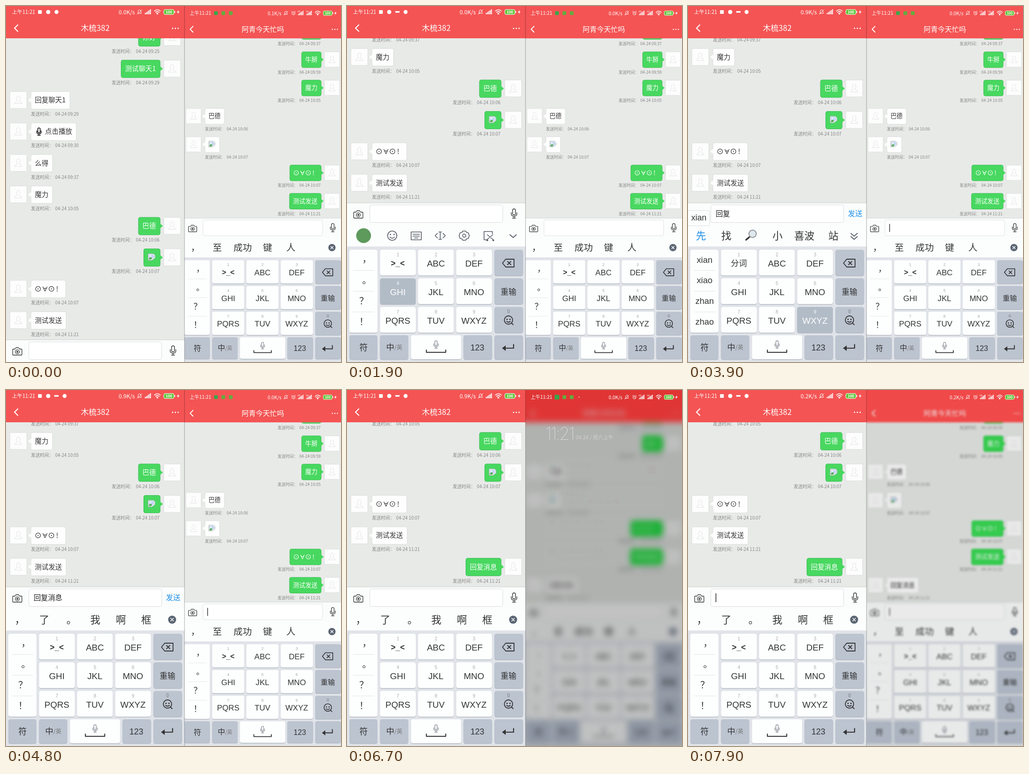
Animation, 726 px wide and 772 px high, one loop 8000 ms. Source, as an HTML page:

```html
<!DOCTYPE html>
<html lang="zh-CN">
<head>
<meta charset="utf-8">
<title>Chat</title>
<style>
html, body { margin: 0; width: 100%; height: 100%; overflow: hidden; background: #e8eae8; }
svg { display: block; }
text { font-family: 'Noto Sans CJK SC', 'Noto Sans CJK', 'Noto Sans', sans-serif; white-space: pre; }
.latin { font-family: 'Liberation Sans', Roboto, sans-serif; }
.symbol { font-family: 'DejaVu Sans', sans-serif; }
.clock { font-family: Inter, Roboto, sans-serif; font-weight: 100; letter-spacing: -3px; }
</style>
</head>
<body>
<svg id="stage" width="726" height="772" viewBox="0 0 726 772"></svg>
<script>
const LOOP = 8000, STEP = 100, PITCH = 68.2;
const RED = '#f45454', GREEN = '#48d860', INK = '#333';

const clamp = v => Math.max(0, Math.min(1, v));
const easeOut = (t, start, length) => 1 - (1 - clamp((t - start) / length)) ** 3;
const within = (t, spans) => spans.some(([a, b]) => t >= a && t < b);

const text = (x, y, s, size, fill = INK, extra = '') =>
  `<text x="${x}" y="${y}" font-size="${size}" fill="${fill}" ${extra}>${s}</text>`;
const mid = (x, y, s, size, fill, extra = '') => text(x, y, s, size, fill, `text-anchor="middle" ${extra}`);
const rect = (x, y, w, h, fill, rx = 0, extra = '') =>
  `<rect x="${x}" y="${y}" width="${w}" height="${h}" rx="${rx}" fill="${fill}" ${extra}/>`;
const circle = (x, y, r, fill, extra = '') => `<circle cx="${x}" cy="${y}" r="${r}" fill="${fill}" ${extra}/>`;
const line = (d, color = INK, width = 1.3) =>
  `<path d="${d}" fill="none" stroke="${color}" stroke-width="${width}" stroke-linecap="round" stroke-linejoin="round"/>`;
const shape = (d, fill) => `<path d="${d}" fill="${fill}"/>`;
const group = (transform, body, extra = '') => `<g transform="${transform}" ${extra}>${body}</g>`;
const at = (x, y, body, scale = 1) => group(`translate(${x} ${y}) scale(${scale})`, body);

// Small icons, drawn around their own centre
const mic = (color, width = 1.4) =>
  `<rect x="-3.2" y="-10" width="6.4" height="13" rx="3.2" fill="none" stroke="${color}" stroke-width="${width}"/>` +
  line('M-6 -2V1Q-6 6 0 6T6 1V-2M0 6V10M-3.5 10H3.5', color, width);
const camera = line('M-9 -5H-5L-3 -8H3L5 -5H9Q10 -5 10 -4V7Q10 8 9 8H-9Q-10 8 -10 7V-4Q-10 -5 -9 -5Z') +
  circle(0, 1, 4.3, 'none', `stroke="${INK}" stroke-width="1.3"`) + circle(0, 1, 2, INK);
const brokenImage = '<path d="M-7.5 -7H4L7.5 -3.5V2L1 7H-7.5Z" fill="#f2f5f7" stroke="#a9afb5" stroke-width="1"/>' +
  shape('M-6 -5.5H3L6 -2V1L0 5H-6Z', '#c4d6f2') + shape('M-6 5.5V3Q-3 -1 1 2L-0.5 5.5Z', '#5cae58') +
  circle(-2.5, -2.5, 1.6, '#fff');
const person = line('M-8 8Q-7 4 -2 3Q-4 0 -4 -4Q-3 -8 0 -8T4 -4Q4 0 2 3Q7 4 8 8Z', '#e2e4e4', 1);
const smiley = circle(0, 0, 10, 'none', 'stroke="#535c66" stroke-width="1.6"') +
  circle(-4, -2.5, 1.4, '#535c66') + circle(4, -2.5, 1.4, '#535c66') + line('M-5 3Q0 8 5 3', '#535c66', 1.6);
const smileSearch = circle(0, 0, 9, 'none', `stroke="${INK}" stroke-width="1.8"`) +
  circle(-3.2, -1.5, 1.5, INK) + circle(3.2, -1.5, 1.5, INK) + line('M-4 3Q0 6.5 4 3M6.5 6.5L10 10', INK, 1.8);
const lens = line('M-4 4L-11 10', '#333', 3.5) + circle(3, -3, 8, '#dfe8ec', 'stroke="#8d9499" stroke-width="2"');
const heart = shape('M0 6Q-7 1 -7 -2.5A3.6 3.6 0 0 1 0 -4A3.6 3.6 0 0 1 7 -2.5Q7 1 0 6Z', '#e2404c');
const bell = line('M-4 3H4L3 1V-2Q2 -5 0 -5T-3 -2V1ZM-5 5L5 -5', '#fff', 1);
const alarm = circle(0, 0.5, 3.8, 'none', 'stroke="#fff" stroke-width="1.1"') +
  line('M0 -1.5V1H2M-5 -3L-3 -5M5 -3L3 -5', '#fff', 1);
const signal = [0, 1, 2, 3, 4].map(i => rect(i * 2.8, 2 - i * 2, 1.9, 3 + i * 2, '#fff')).join('');
const wifi = line('M-6.5 -2Q0 -8 6.5 -2M-4 0.8Q0 -3 4 0.8', '#fff', 1.6) + circle(0, 3.4, 1.9, '#fff');
const battery = rect(0, -5.5, 22, 11, '#62c63c', 3, 'stroke="#fff" stroke-width="1"') + rect(22.8, -2, 1.6, 4, '#fff') +
  mid(11, 3.2, '100', 8.5, '#fff', 'class="latin" font-weight="bold"');
const bolt = shape('M1.5 -5L-3 1H0L-1.5 5L3 -1H0Z', '#fff');

function bubbleBody(body, color) {
  if (body === 'image') return [18, at(8.5, 18, brokenImage)];
  if (body === 'face') {
    const eye = x => circle(x, 19, 5.2, 'none', `stroke="${color}" stroke-width="1.2"`) + circle(x, 19, 1.1, color);
    return [58, eye(7) + line('M17.5 14.5L22 24L26.5 14.5M19 18H25', color, 1.2) + eye(36) + text(46, 24.5, '!', 15, color)];
  }
  const label = body.replace('♪', ''), voice = label !== body;
  const width = [...label].reduce((w, c) => w + (c < '~' ? 8.2 : 14.7), 0) + (voice ? 22 : 0);
  const icon = voice ? at(9, 19, mic('#222', 2.2), 0.8) : '';
  return [width, icon + text(voice ? 22 : 0, 24, label, 14.7, color)];
}

function message(y, [own, body, time]) {
  const [inner, content] = bubbleBody(body, own ? '#fff' : INK);
  const w = inner + 17.5, x = own ? 334 - w : 54, fill = own ? GREEN : '#fdfefd', edge = own ? '#3fc057' : '#dbdedc';
  const tail = own ? 'M333.5 13.5L340 19L333.5 24.5' : 'M54.5 13.5L48 19L54.5 24.5';
  const avatarX = own ? 342 : 8.5, stampX = own ? 229 : 54;
  return at(0, y,
    rect(avatarX, 0.5, 36.5, 36.5, '#fcfdfc', 1.5, 'stroke="#dcdfdd" stroke-width="1"') + at(avatarX + 18.2, 18, person) +
    rect(x, 0.3, w, 38, fill, 4, `stroke="${edge}" stroke-width="1.1"`) + shape(tail, fill) +
    at(x + 8.5, 0, content) +
    text(stampX, 53, '发送时间：', 9.7, '#858585') + text(stampX + 52.5, 53, '04-24 ' + time, 9.7, '#858585'));
}
const chat = (top, rows) => rows.map((row, i) => message(top + i * PITCH, row)).join('');

const LEFT_ROWS = [
  [1, '你好', '09:25'], [1, '测试聊天1', '09:29'], [0, '回复聊天1', '09:29'], [0, '♪点击播放', '09:30'],
  [0, '么得', '09:37'], [0, '魔力', '10:05'], [1, '巴德', '10:06'], [1, 'image', '10:07'],
  [0, 'face', '10:07'], [0, '测试发送', '11:21'], [1, '回复消息', '11:21']];
const RIGHT_ROWS = [
  [1, '么得', '09:37'], [1, '牛掰', '09:59'], [1, '魔力', '10:05'], [0, '巴德', '10:06'], [0, 'image', '10:07'],
  [1, 'face', '10:07'], [1, '测试发送', '11:21'], [0, '回复消息', '11:21']];

function inputBar({ value = '', cursor, pinyin = '' }) {
  const caretX = 60.5 + value.length * 15.5;
  return rect(-60, 427, 520, 48, '#fbfdfc') + rect(-60, 426.5, 520, 1, '#cdd0cf') + at(24.5, 452, camera) +
    rect(49.5, 431.5, 288, 38, '#fff', 4, 'stroke="#dadddc" stroke-width="1"') +
    (value ? text(60, 455.5, value, 15.5, '#222') + text(346.5, 455.5, '发送', 15.7, '#1d8fe8') : at(362, 450, mic(INK))) +
    (cursor ? rect(caretX - 1, 441, 2, 19, '#555') : '') +
    (pinyin ? rect(-1, 443.5, 48 + Math.max(0, pinyin.length - 4) * 9, 33, '#fcfdfd', 3, 'stroke="#dcdfe2"') +
      text(7, 465, pinyin, 18, INK, 'class="latin"') : '');
}

const toolbar = () =>
  circle(36, 498, 16, '#5d9a5c') + at(98, 498, smiley) +
  line('M139 490H161V507H139ZM143 495H157M143 499H157M146 503H154', '#535c66', 1.6) +
  line('M196 493L191 498L196 503M208 493L213 498L208 503M202 490V506M199 490H205M199 506H205', '#535c66', 1.6) +
  line('M251 488H257L259 491L263 492L265 498L263 504L259 505L257 508H251L249 505L245 504L243 498L245 492L249 491Z', '#535c66', 1.6) +
  circle(254, 498, 3.5, 'none', 'stroke="#535c66" stroke-width="1.6"') +
  line('M304 507H297V489H315V494M304 496L316 506M304 506L316 496', '#535c66', 1.6) +
  circle(304, 508, 2, '#535c66') + circle(317, 508, 2, '#535c66') + line('M353 496L360 502L367 496', '#535c66', 1.8);

const words = (list, xs, firstColor = INK) => list.map((w, i) =>
  w === 'lens' ? at(137, 497, lens) : mid(xs[i], 506, w, 22, i ? INK : firstColor)).join('');
const suggestions = (list, xs) => words(list, xs) + circle(360, 498, 8.7, '#5a6573') +
  line('M357 495L363 501M363 495L357 501', '#fff', 1.6);
const candidateStrip = list => words(list, [28, 83, 138, 194, 252, 315], '#1d8fe8') +
  line('M353 493L360 499L367 493M353 500L360 506L367 500', '#535c66', 1.7);

function keyboard({ strip, options, pressed }) {
  const key = (x, y, w, h, gray, body = '', down) =>
    rect(x, y + 1.6, w, h, '#b4bac3', 4.5) + rect(x, y, w, h, down ? '#b2bcc7' : gray ? '#bcc4d0' : '#fdfefe', 4.5) + body;
  const letters = [options ? '分词' : '&gt;_&lt;', 'ABC', 'DEF', 'GHI', 'JKL', 'MNO', 'PQRS', 'TUV', 'WXYZ'];
  const pad = letters.map((name, i) => {
    const x = 71.5 + (i % 3) * 82.5, y = 528.5 + Math.floor(i / 3) * 62, down = name === pressed;
    const label = i ? mid(x + 38.7, y + 36, name, 19, down ? '#fff' : INK, 'class="latin"')
      : mid(x + 38.7, y + 35, name, 17.5, INK, options ? '' : 'class="latin" font-weight="bold"');
    return key(x, y, 77.5, 56, false, mid(x + 38.7, y + 14, i + 1, 10, down ? '#fff' : '#aaa', 'class="latin"') + label, down);
  }).join('');
  const marks = options
    ? options.map((s, i) => mid(36, 556.5 + i * 44.7, s, 18.5, INK, 'class="latin"'))
    : ['，', '。', '？', '！'].map((s, i) => text([33, 33, 26.5, 26.5][i], [556, 602, 647, 692][i], s, 20));
  return rect(-60, 474.5, 520, 48, '#fcfdfd') + strip + rect(-60, 521.5, 520, 350, '#e0e4e9') +
    key(5, 528.5, 61, 180, false, marks.join('')) + [573, 618, 663].map(y => rect(13, y, 46, 1, '#e2e5e8')).join('') + pad +
    key(319.5, 528.5, 62, 56, true, line('M344 549H362V566H344L337 557.5ZM348 554L355 561M355 554L348 561', INK, 1.8)) +
    key(319.5, 590.5, 62, 56, true, mid(350, 625.5, '重输', 17, INK, 'font-weight="500"')) +
    key(319.5, 652.5, 62, 56, true, mid(350, 666, '0', 10, '#777', 'class="latin"') + at(350, 681, smileSearch)) +
    key(5, 714, 61, 52, true, mid(36, 746.5, '符', 18)) +
    key(71.5, 714, 61.5, 52, true, text(85, 746, '中', 17.5) + text(102.5, 745, '/英', 12.5, '#777')) +
    key(138.5, 714, 109, 52, false, at(193, 734, mic('#8f969e', 1.8), 0.8) + line('M172 746V751H214V746', INK, 2)) +
    key(252.5, 714, 62, 52, true, mid(282.5, 746.5, '123', 18, INK, 'class="latin"')) +
    key(319.5, 714, 62, 52, true, line('M361 734V742H339', INK, 2.2) + shape('M344 736L336 742L344 748Z', INK));
}

const header = title => rect(-60, -100, 520, 170, RED) + line('M25.5 41L18.5 48L25.5 55', '#fff', 2.2) +
  mid(193.5, 54, title, 17, '#fff') + [361, 367, 373].map(x => circle(x, 48.5, 1.4, '#fff')).join('');

// Key presses: time, key, reading shown once the key is released
const STROKES = [
  [1900, 'GHI', 'g'], [2100, 'TUV', 'gu'], [2300, 'GHI', 'hui'], [2500, 'DEF', 'huid'], [2600, 'TUV', 'huifu'],
  [3300, 'WXYZ', 'w'], [3500, 'GHI', 'xi'], [3600, 'ABC', 'xia'], [3700, 'MNO', 'xian'], [3900, 'WXYZ', 'xiaox'], [4100, 'GHI', 'xiaoxi']];
const READINGS = {
  g: ['g h i gh', '个 给 过 会 和 还'], gu: ['gu hu gv hv', '故 湖 古 股 户 顾'], hui: ['hui gui huh gug', '会 贵 回 归 惠 汇'],
  huid: ['hui gui hu gu', '会得 回到 归 会 贵 回'], huifu: ['hui gui hu gu', '回复 恢复 会 回 归 汇'],
  w: ['w x y z', '我 在 一 想 这 有'], xi: ['xi yi zi wi', '一 系 以 已 西 洗'], xia: ['xia zha ya xi', '下 呀 炸 夏 吓 压'],
  xian: ['xian xiao zhan zhao', '先 找 lens 小 喜波 站'], xiaox: ['xiao zhao xian xia', '小心 消 找 小 笑 校'],
  xiaoxi: ['xiao xian xia xi', '消息 小溪 找 小 笑 校']};

function leftPhone(t) {
  const open = easeOut(t, 1100, 400), sent = easeOut(t, 5100, 200);
  const commit = t >= 4400 ? 4400 : t >= 3000 ? 3000 : 0;
  const done = STROKES.filter(s => s[0] + STEP <= t && s[0] >= commit);
  const pinyin = done.length ? done[done.length - 1][2] : '';
  const stroke = STROKES.find(s => t >= s[0] && t < s[0] + STEP);
  const [options, candidates] = pinyin ? READINGS[pinyin].map(s => s.split(' ')) : [];
  const value = commit === 0 || t >= 5100 ? '' : commit === 3000 ? '回复' : '回复消息';
  const cursor = within(t, [[1500, 1800], [3000, 3500], [4000, 4800], [6000, 6500], [7000, 7600], [7900, 8000]]);
  const strip = pinyin ? candidateStrip(candidates)
    : commit ? suggestions(['，', '了', '。', '我', '啊', '框'], [30, 83, 142, 193.5, 249, 304]) : toolbar();
  const speed = t >= 7700 ? '0.2' : t >= 3500 ? '0.9' : '0.0';
  const typing = t >= 1300;
  return `<svg width="387" height="772">` + rect(0, 0, 387, 772, '#e8eae8') +
    chat(48.8 - 298 * open - PITCH * sent, LEFT_ROWS) +
    at(0, 297 * (1 - open), keyboard({ strip, options, pressed: stroke && stroke[1] }) + inputBar({ value, cursor, pinyin })) +
    header('木梳382') + text(13, 17.3, '上午11:21', 11.2, '#fff') +
    rect(69.5, 9, 8, 8, '#fff') + circle(91.5, 13, 4.6, '#fff') +
    (typing ? rect(104.5, 11, 9.5, 3.5, '#fff', 1) : '') + circle(typing ? 127 : 109.5, 13, 4.4, '#fff') +
    text(244, 17.5, speed + 'K/s', 12.2, '#fff') + at(289.5, 13, bell) + at(301, 13, signal) +
    at(328, 13, wifi) + at(342, 13, battery) + at(373, 13, bolt) + '</svg>';
}

const CARDS = [
  ['阿青今天忙吗', '回复消息'], ['选择输入法', ''],
  ['已连接到 USB 调试', '点按即可关闭 USB 调试'], ['正在通过 USB 充电', '点按即可查看更多选项。']];

// Notification shade; c runs from 0 (hidden) to 1 (settled)
function shade(c) {
  const far = 1 - c;
  const drop = (shrink, dy, body, opacity) =>
    group(`translate(556.5 ${dy * far}) scale(${1 - shrink * far}) translate(-556.5 0)`, body, `opacity="${opacity}"`);
  const clock = text(411, 89.5, '11:21', 43, '#fff', 'class="clock"') +
    text(486.5, 88.5, '04.24 / 周六上午', 12.8, '#e4dede');
  const settings = line('M686 86H692M686 86L688 83V78Q689 73 693 73T698 77M691 72V71', '#ddd', 1.3) +
    circle(697, 84, 4, 'none', 'stroke="#ddd" stroke-width="1.3"') + circle(697, 84, 1.3, '#ddd');
  const cards = CARDS.map(([title, body], i) => {
    const y = 114.5 + i * 75.2;
    return rect(395, y, 323.5, 65, '#f6f5f5', 16) + rect(411, y + 15.5, 17, 17, i ? '#58b947' : '#19a34c') +
      text(438, y + 28, title, 14, '#1c1c1c', 'font-weight="500"') + text(438, y + 48.5, body, 12.8, '#777');
  }).join('');
  const ime = text(441, 238, '- ZO输入法', 12.8, '#777') + at(521.5, 233, heart) +
    text(530, 237, '(ҩ◔◡◔ҩ)', 10.5, '#555', 'class="symbol"') + at(589.5, 233, heart);
  const close = circle(556.5, 715.5, 22.5, '#fafafa') + line('M552 711L561 720M561 711L552 720', '#222', 1.5);
  return drop(0.18, 41, clock, clamp(c * 2.5)) + drop(0.18, 41, settings, c ** 3) +
    drop(0.25, 71, cards + ime + circle(683, 147, 13, '#ee4a5c'), c ** 3) + drop(0, 40, close, c ** 3);
}

function rightPhone(t) {
  const closing = t >= 7600;
  const dim = closing ? 1 - (t - 7550) / 480 : easeOut(t, 6600, 240);
  const cards = closing ? clamp(1 - (t - 7550) / 300) : easeOut(t, 6650, 500);
  const blur = 8 * dim + 22 * clamp((dim - 0.8) / 0.2);
  const look = dim > 0 ? `style="filter:blur(${blur.toFixed(2)}px) brightness(${1 - 0.3 * dim}) saturate(${1 + 0.5 * dim})"` : '';
  const cursor = within(t, [[200, 700], [1200, 1800], [2300, 2600], [3100, 3500], [3800, 4100], [4800, 5300], [5800, 6200], [7600, 8000]]);
  const strip = suggestions(['，', '至', '成功', '键', '人'], [31, 84, 145, 205, 261]);
  const scroll = -42.2 - PITCH * easeOut(t, 5300, 200);
  const speed = t >= 7700 ? '0.2' : t < 500 ? '0.1' : '0.0';
  const received = t >= 5400;
  const notices = t > 6800 ? '' : text(398, 19.3, '上午11:21', 10.4, '#fff') +
    [455, 471, 487].map((x, i) => {
      const size = !i && received ? 10 : 8;
      return rect(x - size / 2, 15.5 - size / 2, size, size, i ? '#62ad3e' : '#3aa64a', 1);
    }).join('') + (received ? circle(503, 15.5, 1, '#fff') : '');
  const small = (x, icon) => at(x, 15.5, icon, 0.88);
  const status = notices + text(567, 19.5, speed + 'K/s', 10.3, '#fff') + small(606.5, bell) + small(623, alarm) +
    small(633, signal) + small(651, signal) + text(632, 14, 'HD', 4.5, '#fff') + text(650, 14, 'HD', 4.5, '#fff') +
    small(675.5, wifi) + small(687.5, battery) + small(714, bolt);
  return `<svg x="387" width="339" height="772" viewBox="387 0 339 772"><g ${look}>` +
    rect(300, -100, 520, 1000, '#e8eae8') +
    at(382.4, 75.7, chat(scroll, RIGHT_ROWS) + keyboard({ strip }) + inputBar({ cursor }), 0.9) +
    at(382.4, 7.2, header('阿青今天忙吗'), 0.9) + '</g>' +
    (cards > 0 ? shade(cards) : '') + status + '</svg>';
}

const stage = document.getElementById('stage');
const began = performance.now();
let shown = '';
function draw(now) {
  const t = Math.floor((Math.max(0, now - began) + 10) / STEP) * STEP % LOOP;
  const scene = leftPhone(t) + rightPhone(t) + rect(386, 0, 1.5, 772, '#000', 0, 'opacity=".22"');
  if (scene !== shown) stage.innerHTML = shown = scene;
  requestAnimationFrame(draw);
}
draw(began);
</script>
</body>
</html>
```
